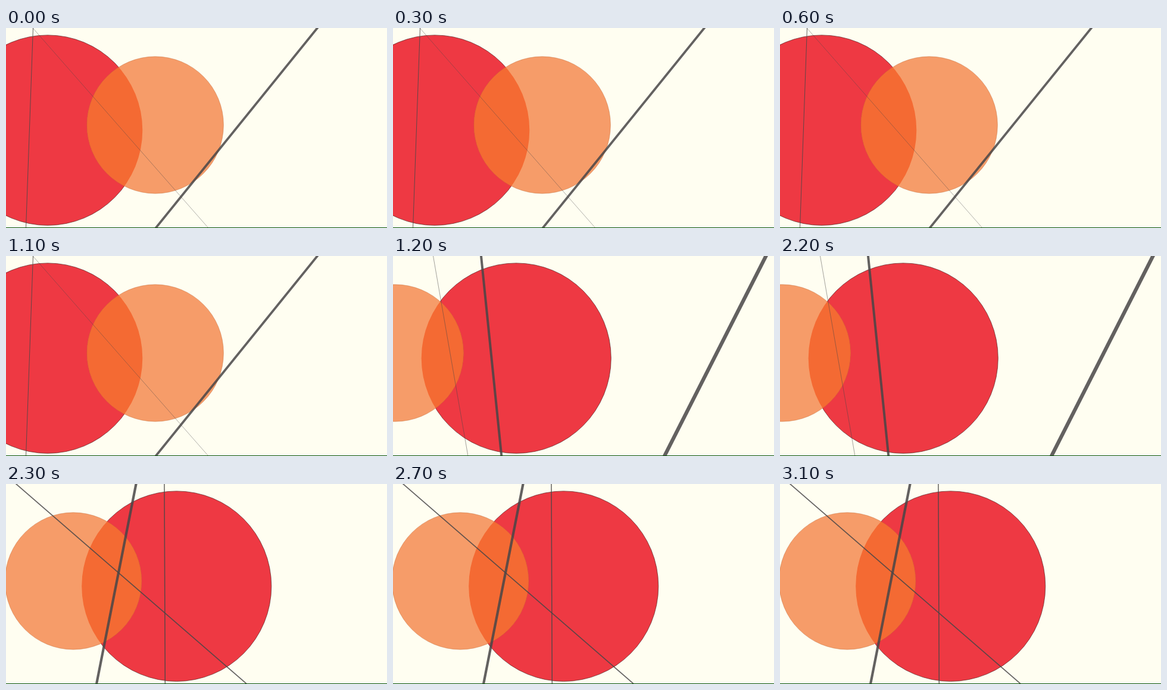
An HTML page with a canvas for the animation above (3.2 s loop, 640 by 335 pixels).

```html
<!DOCTYPE html>
<html lang="en">
<head>
<meta charset="utf-8">
<title>Circles and lines</title>
<style>
html, body { margin: 0; width: 100%; height: 100%; overflow: hidden; background: #fffef1; }
canvas { display: block; width: 640px; height: 335px; }
</style>
</head>
<body>
<canvas id="stage" width="640" height="335"></canvas>
<script>
const ctx = document.getElementById('stage').getContext('2d');
const W = 640, H = 335, LOOP = 3200;

function circle(x, y, r) {
  const path = new Path2D();
  path.arc(x, y, r, 0, Math.PI * 2);
  return path;
}

function paint(path, fill, edge) {
  ctx.fillStyle = fill;
  ctx.fill(path);
  ctx.strokeStyle = edge;
  ctx.lineWidth = 0.9;
  ctx.stroke(path);
}

// The orange disc looks see-through: it takes a deeper tone inside the red one.
function discs(redX, orangeX) {
  const red = circle(redX, 171.2, 159.3);
  const orange = circle(orangeX, 162.5, 114.7);
  paint(red, '#ee3943', 'rgba(80,30,30,0.75)');
  paint(orange, '#f69c69', 'rgba(190,105,55,0.5)');
  ctx.save();
  ctx.clip(red);
  paint(orange, '#f46a33', 'rgba(215,80,45,0.4)');
  ctx.restore();
}

// A line across the full height, from x = top to x = bottom.
function line(top, bottom, width) {
  const over = (bottom - top) / H * 10;
  ctx.beginPath();
  ctx.moveTo(top - over, -10);
  ctx.lineTo(bottom + over, H + 10);
  ctx.strokeStyle = 'rgba(72,70,71,0.85)';
  ctx.lineWidth = width;
  ctx.stroke();
}

function opening() {
  discs(70, 250.7);
  line(45.5, 33.5, 1);
  line(45, 340, 0.5);
  line(523, 251.5, 3.8);
}

function middle() {
  discs(207, 3.7);
  line(67.5, 126, 0.6);
  line(148, 182.3, 4);
  line(626.5, 456, 6.2);
}

function closing() {
  discs(286.5, 113);
  line(17, 404.5, 1.7);
  line(266, 267.3, 1.5);
  line(218.5, 152, 4.2);
}

function draw(t) {
  ctx.fillStyle = '#fffef1';
  ctx.fillRect(0, 0, W, H);
  if (t < 1200) opening();
  else if (t < 2300) middle();
  else closing();
  ctx.fillStyle = '#075207';
  ctx.fillRect(0, H - 1, W, 1);
}

const start = performance.now();

function frame() {
  draw((performance.now() - start) % LOOP);
  requestAnimationFrame(frame);
}
frame();
</script>
</body>
</html>
```
